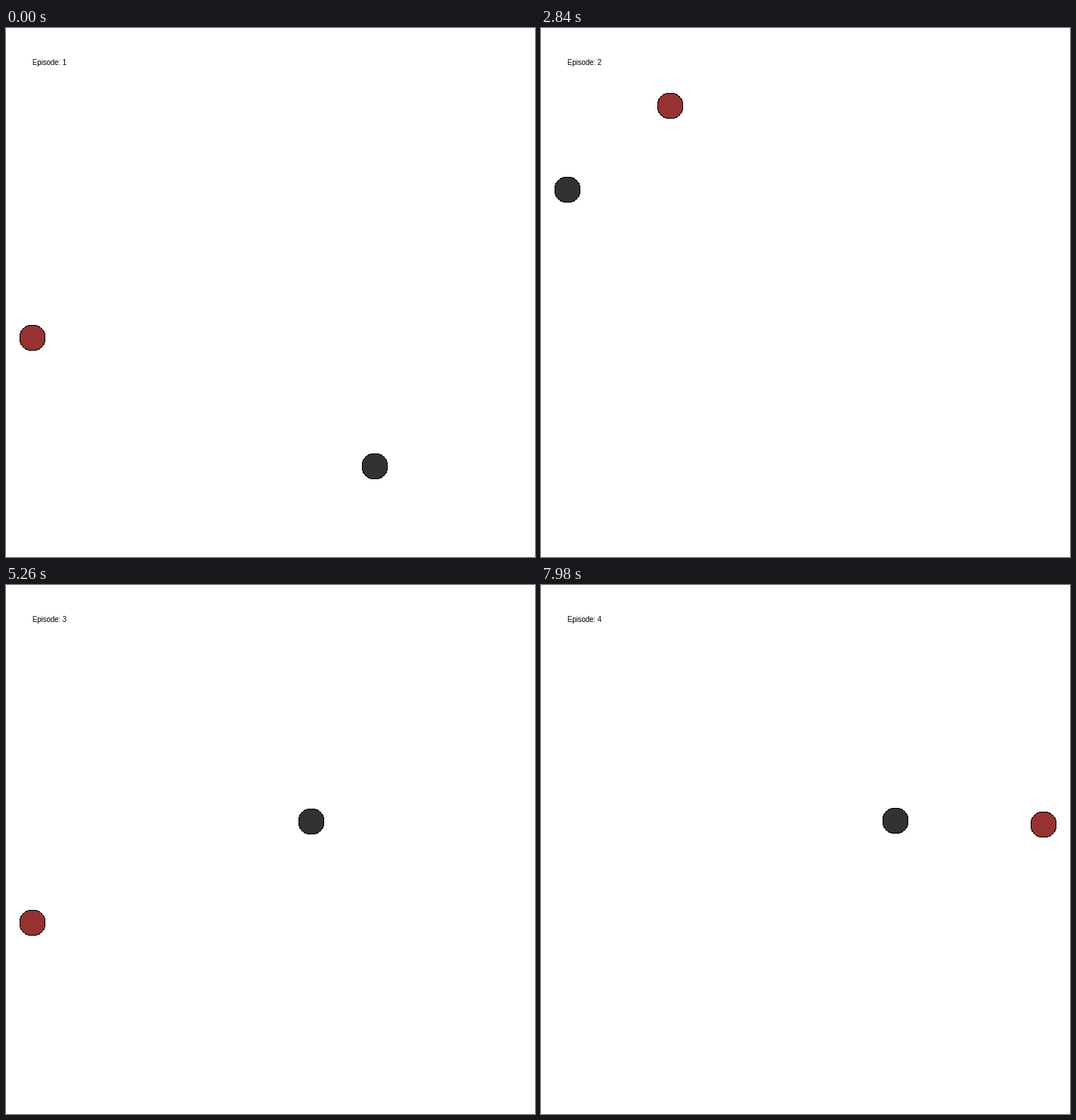
Animation, 700 px wide and 700 px high, one loop 8000 ms. Source, as a matplotlib script:

```python
import matplotlib.pyplot as plt
import numpy as np
from matplotlib.animation import FuncAnimation
from matplotlib.patches import Circle

SIZE, DPI = 700, 100
TICK, LOOP = 20, 8000
EPISODE_MS = 2320  # one 20 ms opening pose, then 23 steps of 100 ms
PX = 72 / DPI

# Turning points (step, x, y) of the chaser and the runner in each episode.
EPISODES = [
    ([(0, 488, 580), (7, 215, 305), (9, 107, 311), (22, 35, 389)],
     [(14, 35, 410), (18, 82, 401)]),
    ([(0, 179, 450), (4, 35, 284), (9, 35, 110), (14, 35, 145), (22, 35, 198)],
     [(0, 150, 86), (14, 198, 126), (22, 224, 165)]),
    ([(0, 665, 509), (6, 457, 307), (13, 89, 350), (22, 35, 390)],
     [(0, 82, 431), (2, 35, 447)]),
    ([(0, 250, 35), (9, 466, 298), (11, 469, 312)],
     [(0, 654, 318), (1, 665, 317)]),
]


def position(path, step):
    """Constant speed between turning points, slowing down on the last leg."""
    steps, xs, ys = zip(*path)
    begin, end = steps[-2:]
    if begin < step < end:
        u = (step - begin) / (end - begin)
        step = begin + (end - begin) * u * (2 - u)
    return round(np.interp(step, steps, xs)), round(np.interp(step, steps, ys))


class Disc:
    def __init__(self, ax, color):
        self.layers = [
            ax.add_patch(Circle((0, 0), r, facecolor=c, linewidth=0,
                                antialiased=False, snap=False))
            for r, c in ((17, "black"), (16, color))
        ]

    def move(self, xy):
        for layer in self.layers:
            layer.center = xy


fig = plt.figure(figsize=(SIZE / DPI, SIZE / DPI), dpi=DPI, facecolor="white")
ax = fig.add_axes([0, 0, 1, 1])
ax.set(xlim=(0, SIZE), ylim=(SIZE, 0))
ax.axis("off")

runner = Disc(ax, "#963232")
chaser = Disc(ax, "#323232")
label = ax.text(35, 49, "", family="Liberation Sans", fontsize=9.7 * PX,
                color="black", ha="left", va="baseline")


def update(frame):
    episode, ms = divmod(frame * TICK, EPISODE_MS)
    step = 0 if ms < 20 else 1 + (ms - 20) // 100
    for disc, path in zip((chaser, runner), EPISODES[episode]):
        disc.move(position(path, step))
    label.set_text(f"Episode: {episode + 1}")
    return [*runner.layers, *chaser.layers, label]


anim = FuncAnimation(fig, update, frames=LOOP // TICK, interval=TICK,
                     init_func=lambda: update(0), repeat=True, repeat_delay=0)
plt.show()
```
